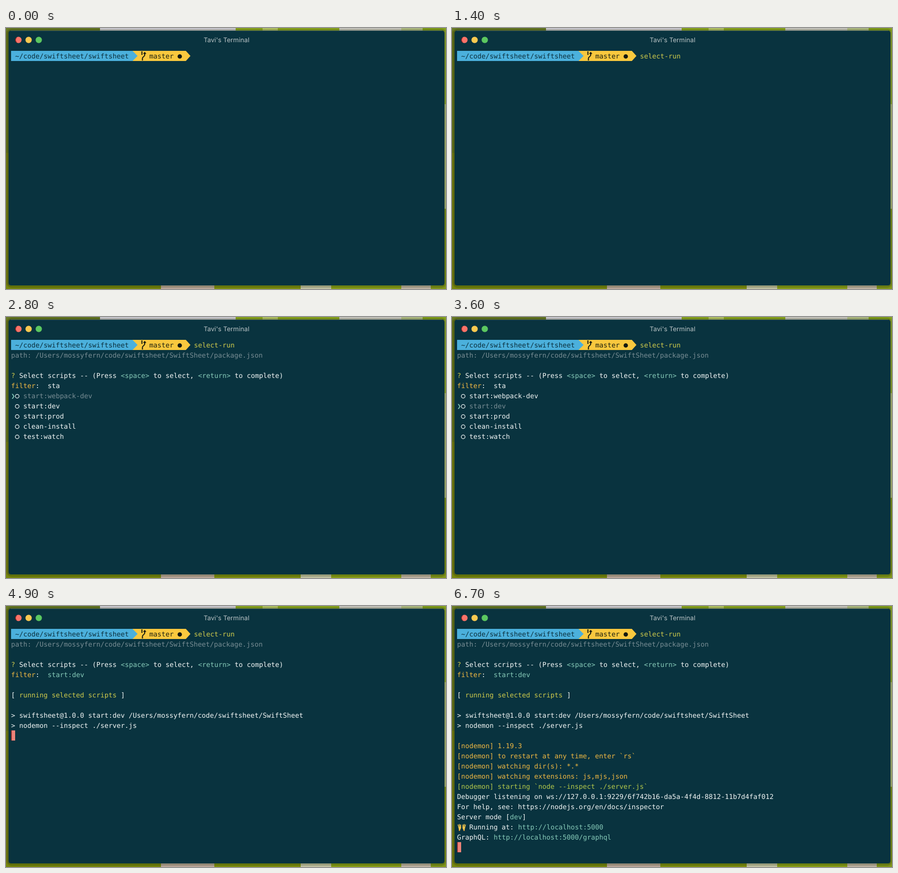
These frames come from a looping animation (866 by 514 pixels, 6800 ms). An HTML page:

```html
<!DOCTYPE html>
<html lang="en">
<head>
<meta charset="utf-8">
<title>Terminal</title>
<style>
  html, body { margin: 0; width: 100%; height: 100%; overflow: hidden; background: #65741c; }
  svg { display: block; width: 866px; height: 514px; }
  text { white-space: pre; text-rendering: geometricPrecision; }
  .mono { font: 13.288px "DejaVu Sans Mono", "Liberation Mono", monospace; }
  .title { font: 12.7px Inter, Roboto, sans-serif; }
</style>
</head>
<body>
<svg viewBox="0 0 866 514">
  <defs>
    <filter id="soft" x="-5%" y="-5%" width="110%" height="110%"><feGaussianBlur stdDeviation="1.5"/></filter>
  </defs>
  <rect width="866" height="514" fill="#65741c"/>
  <g id="desk"></g>
  <rect x="4" y="4" width="860" height="505" rx="7" fill="none" stroke="#122008" stroke-opacity=".4" stroke-width="3" filter="url(#soft)"/>
  <rect x="5" y="5" width="858" height="502" rx="5" fill="#09333f"/>
  <path d="M9 5.5H859" stroke="#48666a" stroke-opacity=".7"/>
  <circle cx="24.5" cy="23.5" r="6.2" fill="#fb7369"/>
  <circle cx="44.5" cy="23.5" r="6.2" fill="#f9c950"/>
  <circle cx="64.5" cy="23.5" r="6.2" fill="#5bc760"/>
  <path d="M21 18.6a6.2 6.2 0 0 0 0 9.8" fill="none" stroke="#7d1a1a" stroke-width="1.2"/>
  <text class="title" x="434" y="28" text-anchor="middle" fill="#b9c3c5">Tavi's Terminal</text>

  <path d="M249 45H354L363 55L354 65H249Z" fill="#f9c83e"/>
  <path d="M10 45H249L259 55L249 65H10Z" fill="#4bb0dc"/>
  <g fill="none" stroke="#15190f" stroke-width="2">
    <path d="M267.5 46v7M268.5 64v-4c0-4 4.5-3 4.5-7v-4"/>
    <path d="M270.5 51l2.5-3 2.5 3" stroke-width="1.4"/>
  </g>
  <circle cx="342" cy="56" r="4.3" fill="#15190f"/>
  <g class="mono">
    <text x="18" y="60" fill="#0b2f3c">~/code/swiftsheet/swiftsheet</text>
    <text x="282" y="60" fill="#1d210f">master</text>
    <g id="content"></g>
  </g>
</svg>
<script>
const LOOP = 6800, STEP = 100, CELL = 8, ROW = 20;
const WHITE = "#f3f7f6", GREY = "#788d94", LIME = "#d0cc4c", GOLD = "#f1b943",
      MINT = "#87cbb9", GREEN = "#b5c94b", PINK = "#ec8379", DARK = "#173640";
const HOME = "/Users/mossyfern/code/swiftsheet/SwiftSheet";

const desk = [
  [0, 0, 185, 6, "#697b25"], [185, 0, 267, 6, "#d8d5dc"], [452, 0, 204, 6, "#91ad20"],
  [505, 0, 30, 6, "#bdcd6a"], [656, 0, 122, 6, "#d3d0c9"], [778, 0, 42, 6, "#b9c58a"],
  [820, 0, 46, 6, "#87a51d"], [0, 6, 5, 240, "#66751b"], [0, 246, 5, 268, "#757e12"],
  [862, 6, 5, 144, "#93ad35"], [862, 150, 5, 206, "#b6c281"], [862, 356, 5, 158, "#81981d"],
  [0, 507, 305, 8, "#77870d"], [305, 507, 105, 8, "#bda99b"], [410, 507, 170, 8, "#7f9010"],
  [580, 507, 60, 8, "#c5c5a5"], [640, 507, 138, 8, "#8aa018"], [778, 507, 58, 8, "#c2b5a5"],
  [836, 507, 30, 8, "#82981a"]
];

const rect = (x, y, w, h, fill) => `<rect x="${x}" y="${y}" width="${w}" height="${h}" fill="${fill}"/>`;
const escapeText = s => s.replace(/&/g, "&amp;").replace(/</g, "&lt;").replace(/>/g, "&gt;");
const colX = col => 10 + col * CELL;
const rowY = row => 45 + row * ROW;

function write(row, col, ...parts) {
  let out = "";
  for (let i = 0; i < parts.length; i += 2) {
    out += `<text x="${colX(col)}" y="${rowY(row) + 15}" fill="${parts[i]}">${escapeText(parts[i + 1])}</text>`;
    col += parts[i + 1].length;
  }
  return out;
}

const cursor = (row, col) => rect(colX(col), rowY(row), CELL, ROW, PINK) +
  (col ? "" : rect(colX(col), rowY(row), 1.3, ROW, "#8c2424"));

function command(time) {
  const full = "select-run";
  if (time < 900) return "";
  if (time >= 1300) return write(0, 45, LIME, full) + (time < 1400 ? cursor(0, 55) : "");
  const n = Math.floor((time - 900) / STEP) + 1;
  return write(0, 45, WHITE, full.slice(0, n)) + rect(colX(45), 62, n * CELL, 1, WHITE) +
    cursor(0, 45 + n) + write(0, 45 + n, DARK, full[n], GREY, full.slice(n + 1));
}

const starts = ["start:webpack-dev", "start:dev", "start:prod"];
const menus = {
  "": ["test", "test:watch", "build", "watch", "precommit", ...starts, "clean-install", "snyk-protect", "prepare"],
  s: [...starts, "snyk-protect", "test", "test:watch", "clean-install"],
  st: [...starts, "test", "test:watch", "clean-install", "snyk-protect"],
  sta: [...starts, "clean-install", "test:watch"]
};

function menu(time) {
  const typed = "sta".slice(0, time < 2400 ? 0 : Math.floor((time - 2400) / 150) + 1);
  const active = typed ? +(time >= 3300) : +(time >= 1800);
  const picked = time >= 3700;
  return write(4, 9, WHITE, typed) + menus[typed].map((name, i) => {
    const row = 5 + i, y = rowY(row) + 11, on = i === active;
    return (on ? write(row, 0, MINT, "❯") : "") +
      `<circle cx="22" cy="${y}" r="3.7" fill="none" stroke="${WHITE}" stroke-width="1.2"/>` +
      (on && picked ? `<circle cx="22" cy="${y}" r="2" fill="${MINT}"/>` : "") +
      write(row, 3, on ? GREY : WHITE, name);
  }).join("");
}

// [time, row, colour, text, ...]
const output = [
  [4700, 8, WHITE, "> swiftsheet@1.0.0 start:dev " + HOME],
  [4700, 9, WHITE, "> nodemon --inspect ./server.js"],
  [5000, 11, GOLD, "[nodemon] 1.19.3"],
  [5000, 12, GOLD, "[nodemon] to restart at any time, enter `rs`"],
  [5000, 13, GOLD, "[nodemon] watching dir(s): *.*"],
  [5000, 14, GOLD, "[nodemon] watching extensions: js,mjs,json"],
  [5000, 15, GREEN, "[nodemon] starting `node --inspect ./server.js`"],
  [5100, 16, WHITE, "Debugger listening on ws://127.0.0.1:9229/6f742b16-da5a-4f4d-8812-11b7d4faf012"],
  [5100, 17, WHITE, "For help, see: https://nodejs.org/en/docs/inspector"],
  [5400, 18, WHITE, "Server mode [", MINT, "dev", WHITE, "]"],
  [5400, 19, WHITE, "   Running at: ", MINT, "http://localhost:5000"],
  [5400, 20, WHITE, "GraphQL: ", MINT, "http://localhost:5000/graphql"]
];

const hand = `<path d="M12 431l1.5 5M14.5 430l.8 5M17 431v5" stroke="#f4c64e" stroke-width="1.6" stroke-linecap="round"/>
  <path d="M12.5 435h5.2v3l-2 3.5h-2z" fill="#f4c64e"/><path d="M13.5 441h2.5v2h-2.5z" fill="#dc9f35"/>`;
const hands = hand + `<g transform="translate(38.5 0) scale(-1 1)">${hand}</g>`;

function run(time) {
  const shown = output.filter(line => time >= line[0]);
  const last = shown.length ? shown[shown.length - 1][1] : 6;
  return write(4, 9, MINT, "start:dev") +
    write(6, 0, WHITE, "[ ", LIME, "running selected scripts", WHITE, " ]") +
    shown.map(([, row, ...parts]) => write(row, 0, ...parts)).join("") +
    (last === 20 ? hands : "") + cursor(last + 1, 0);
}

function draw(time) {
  let out = command(time);
  if (time >= 1500) {
    out += write(1, 0, GREY, `path: ${HOME}/package.json`) +
      write(3, 0, LIME, "?", WHITE, " Select scripts -- (Press ", MINT, "<space>", WHITE,
        " to select, ", MINT, "<return>", WHITE, " to complete)") +
      write(4, 0, GOLD, "filter", WHITE, ":") + (time < 4200 ? menu(time) : run(time));
  }
  return out;
}

document.getElementById("desk").innerHTML = desk.map(patch => rect(...patch)).join("");
const content = document.getElementById("content");
const begin = performance.now();
let drawnTime = -1;

function tick() {
  const time = Math.floor(((performance.now() - begin) % LOOP) / STEP) * STEP;
  if (time !== drawnTime) {
    content.innerHTML = draw(time);
    drawnTime = time;
  }
  requestAnimationFrame(tick);
}
tick();
</script>
</body>
</html>
```
